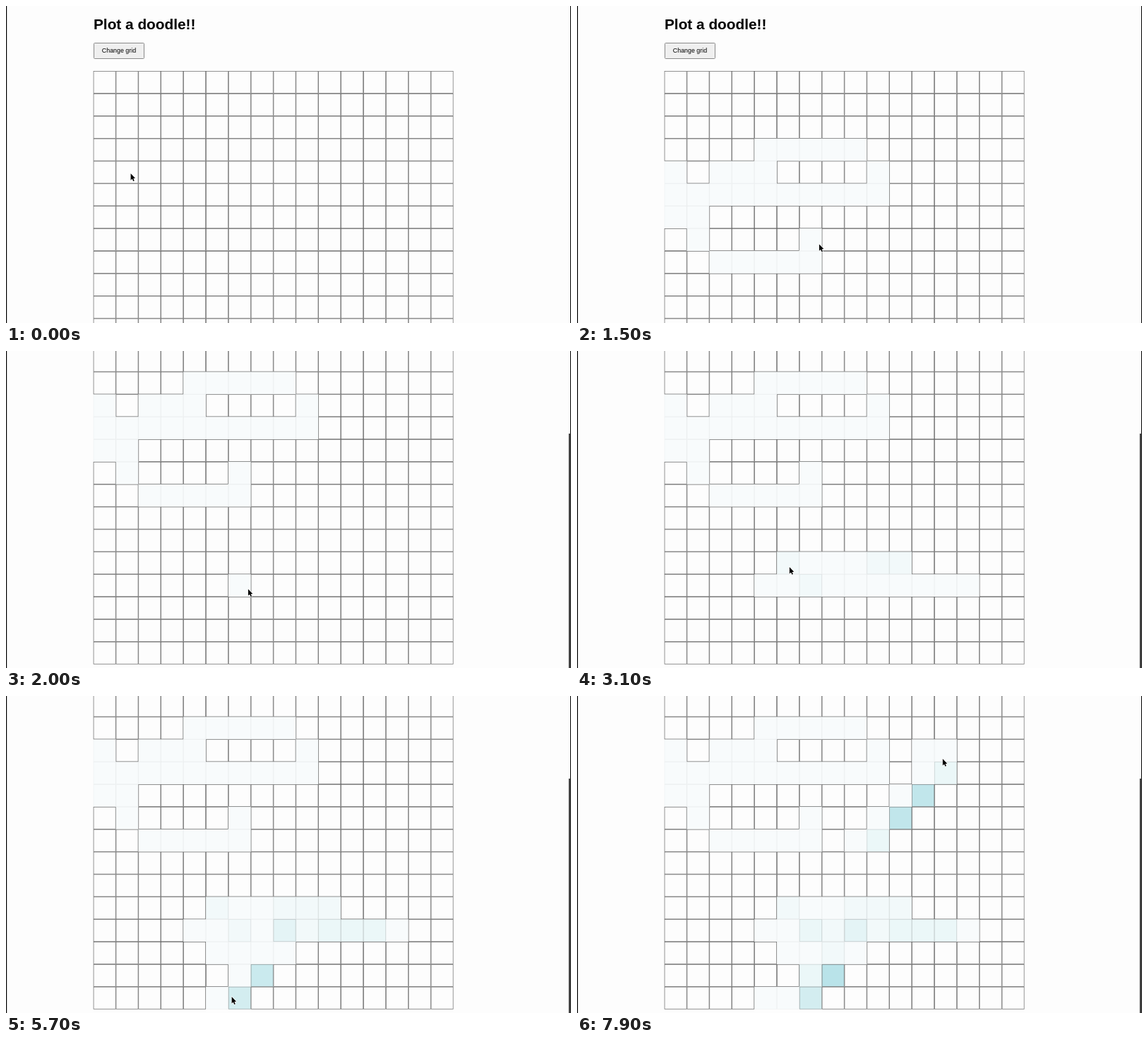
Write an HTML page with a canvas that moves like this. It is 800 px wide and 449 px high and loops after 8 s.

```html
<!DOCTYPE html>
<html lang="en">
<head>
<meta charset="utf-8">
<title>Plot a doodle</title>
<style>
  html, body { margin: 0; width: 100%; height: 100%; overflow: hidden; background: #fdfdfd; }
  canvas, header, h1, .button { position: absolute; margin: 0; }
  canvas, header { left: 0; top: 0; }
  header { font-family: "Liberation Sans", Arial, sans-serif; color: #000; }
  h1 { left: 124px; top: 13px; font-size: 20.8px; line-height: 26px; white-space: nowrap; }
  .button {
    left: 124px; top: 52px; width: 72px; height: 23px; box-sizing: border-box;
    border: 1px solid #8a8a8a; border-radius: 1.5px; background: #efefef;
    font-size: 8.9px; line-height: 21px; text-align: center; white-space: nowrap;
  }
</style>
</head>
<body>
<canvas width="800" height="449"></canvas>
<header><h1>Plot a doodle!!</h1><div class="button">Change grid</div></header>
<script>
const ctx = document.querySelector('canvas').getContext('2d');
const header = document.querySelector('header');
const W = 800, H = 449, N = 16, SIZE = 31.86, LEFT = 123.7, TOP = 92.1, LINE = .7;
const SCROLL = 158.2, SCROLL_START = 16, SCROLL_END = 20;
const TICK = 100, LOOP = 8000;

const path = [];   // pointer waypoints, whole numbers are cell centres
const marks = [];  // cells the pointer enters, with their times

function moveTo(t, x, y, first) {
  const last = path[path.length - 1];
  path.push({ t, x, y, first });
  if (!last) return;
  const c = Math.round(x), r = Math.round(y);
  const dx = c - Math.round(last.x), dy = r - Math.round(last.y);
  // Straight and diagonal moves mark every cell passed, quick flicks only the last.
  const straight = !dx || !dy || Math.abs(dx) === Math.abs(dy);
  const steps = first || !straight ? 1 : Math.max(1, Math.abs(dx), Math.abs(dy));
  for (let k = 0; k < steps; k++) {
    marks.push({
      t: first ? t : t - (t - last.t) * k / steps,
      cell: (r - Math.sign(dy) * k) * N + c - Math.sign(dx) * k
    });
  }
}

// Moves through the points at an even beat from one tick to another.
function stroke(start, end, ...points) {
  points.forEach(([x, y], i) =>
    moveTo(start + (end - start) * i / (points.length - 1 || 1), x, y, i === 0));
}

// Rubs to and fro between two cells.
function rub(start, end, a, b, passes) {
  stroke(start, end, ...Array.from({ length: passes + 1 }, (_, i) => i % 2 ? b : a));
}

stroke(1, 10, [1.16, 4.09], [4, 4], [4, 3], [8, 3], [9, 4], [9, 5], [0, 5], [0, 4]);
stroke(11, 15, [0, 6], [1, 6], [1, 7], [2, 8], [6, 8], [6.38, 7.23]);
stroke(20, 20, [6.38, 12.19]);
stroke(22, 24, [7, 12], [13, 12]);
rub(25, 27, [10, 11], [9, 11], 3);
stroke(28, 31, [8, 11], [5, 11], [4, 12], [6, 12], [5.06, 11.21]);
stroke(32, 39, [8, 11], [12, 12], [9, 12], [12, 12], [8, 13], [5, 13], [6, 14], [6, 15]);
rub(40, 46, [8, 12], [6.91, 13.76], 5);
rub(47, 54, [6, 15], [7, 14], 7);
stroke(55, 57, [5, 15], [5.65, 14.98]);
stroke(58, 62, [4, 15], [6, 14], [7, 12], [6, 12], [7, 13], [6, 14]);
stroke(64, 64, [7, 14]);
rub(65, 70, [9, 8], [11, 6], 5);
stroke(71, 72, [8, 8], [11, 5]);
stroke(73, 73, [7, 14]);
rub(74, 76, [12, 5], [10, 7], 5);
stroke(77, 77, [11, 4]);
stroke(79, 79, [11.87, 4.4]);

const arrow = new Path2D('M0-1V8.4L2.1 6.5 3.6 9.8 5.1 9.1 3.7 6 6.4 5.7Z');

function pointerAt(tick) {
  let i = 0;
  while (path[i + 1] && path[i + 1].t <= tick + 1e-6) i++;
  const a = path[i], b = path[i + 1];
  const moving = b && !b.first;
  const f = moving ? Math.max(0, (tick - a.t) / (b.t - a.t)) : 0;
  const x = moving ? a.x + (b.x - a.x) * f : a.x;
  const y = moving ? a.y + (b.y - a.y) * f : a.y;
  const scroll = a.t < SCROLL_START ? 0 : SCROLL;
  return [LEFT + (x + .5) * SIZE, TOP + (y + .5) * SIZE - scroll];
}

function drawGrid(tick, scroll) {
  const visits = new Array(N * N).fill(0);
  for (const m of marks) if (m.t <= tick + 1e-6) visits[m.cell]++;
  ctx.fillStyle = 'powderblue';
  ctx.strokeStyle = '#666';
  ctx.lineWidth = LINE;
  visits.forEach((n, i) => {
    const x = LEFT + i % N * SIZE, y = TOP + Math.floor(i / N) * SIZE - scroll;
    ctx.globalAlpha = n ? Math.min(1, (n / 10) ** 1.2) : 1;
    if (n) ctx.fillRect(x, y, SIZE, SIZE);
    ctx.strokeRect(x + LINE / 2, y + LINE / 2, SIZE - LINE, SIZE - LINE);
  });
  ctx.globalAlpha = 1;
}

function draw(now) {
  const tick = Math.floor(now % LOOP / TICK);
  const progress = Math.min(1, Math.max(0, (tick - SCROLL_START) / (SCROLL_END - SCROLL_START)));
  const scroll = SCROLL * progress;
  header.style.transform = `translateY(${-scroll}px)`;

  ctx.fillStyle = '#fdfdfd';
  ctx.fillRect(0, 0, W, H);
  drawGrid(tick, scroll);

  ctx.fillStyle = '#000';
  ctx.fillRect(0, 0, 1.2, H);
  ctx.fillRect(W - 1, 0, 1, H);
  if (scroll) {
    const thumb = H * H / (H + SCROLL);
    ctx.fillStyle = '#3c3c3c';
    ctx.fillRect(W - 3.2, (H - thumb) * progress, 3.2, thumb);
  }

  ctx.save();
  ctx.translate(...pointerAt(tick));
  ctx.strokeStyle = '#fff';
  ctx.lineWidth = 1.2;
  ctx.stroke(arrow);
  ctx.fillStyle = '#000';
  ctx.fill(arrow);
  ctx.restore();

  requestAnimationFrame(draw);
}
requestAnimationFrame(draw);
</script>
</body>
</html>
```
